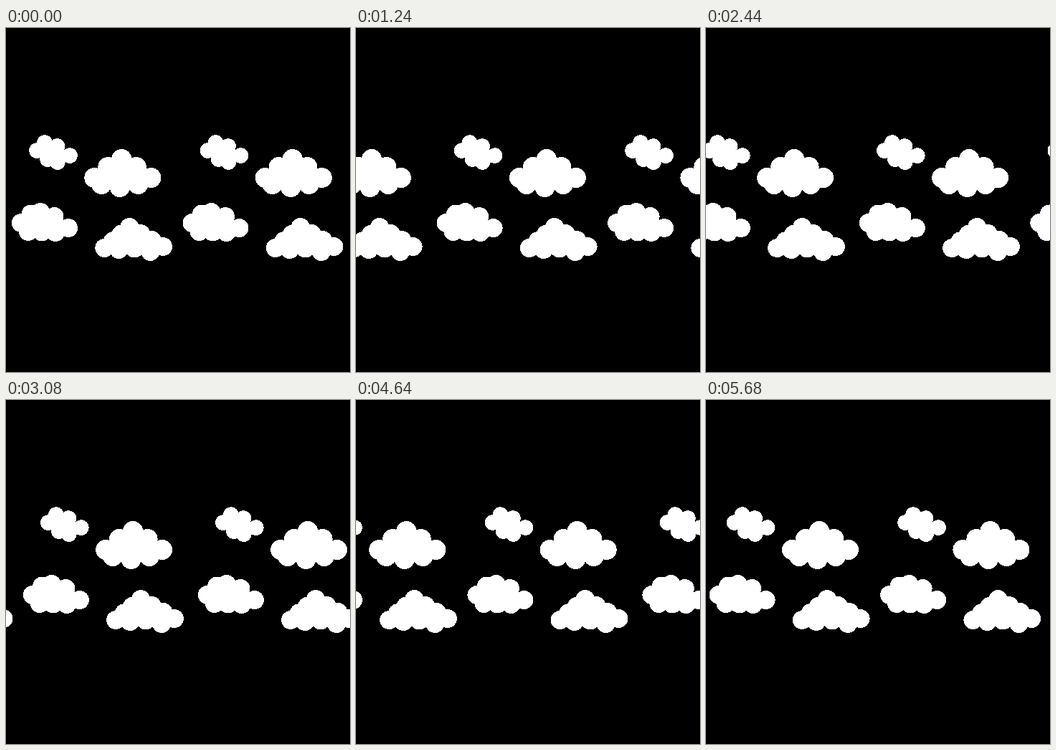
Write an HTML page with a canvas that moves like this. It is 480 by 480 pixels and loops after 5.72 s.

```html
<!DOCTYPE html>
<html lang="en">
<head>
<meta charset="utf-8">
<title>Drifting clouds</title>
<style>
  html, body { margin: 0; width: 100%; height: 100%; overflow: hidden; background: #000; }
  canvas { display: block; width: 100vmin; height: 100vmin; }
</style>
</head>
<body>
<canvas id="stage" width="480" height="480"></canvas>
<script>
const LOOP = 5720, STEP = 40;
const SPAN = 482.5, GAP = 238.5;
const TOP = 140, BAND = 200;

// Evenly spaced points from a to b, b left out; the row bows down by sag.
function row(a, b, steps, sag = 0) {
  return Array.from({ length: steps }, (_, i) => {
    const t = i / steps;
    return [
      a[0] + (b[0] - a[0]) * t,
      a[1] + (b[1] - a[1]) * t + sag * Math.sin(Math.PI * t)
    ];
  });
}

// A cloud is a ring of equal puffs: up to the peak, down again, back along the base.
function cloud({ r, left, peak, right, base, rise, fall, floor, arch = 0, sag = 0 }) {
  const [start, end] = base;
  const ring = [
    ...row(left, peak, rise, -arch),
    ...row(peak, right, fall, -arch),
    right,
    ...row(end, start, floor, sag),
    start
  ];
  const path = new Path2D();
  ring.forEach(([x, y]) => path.lineTo(x, y));
  path.closePath();
  for (const [x, y] of ring) {
    const puff = new Path2D();
    puff.arc(x, y, r, 0, Math.PI * 2);
    path.addPath(puff);
  }
  return path;
}

const clouds = [
  cloud({ r: 10.8, left: [43, 171], peak: [54, 160], right: [89, 178],
    base: [[58, 183], [72, 187]], rise: 1, fall: 2, floor: 1, arch: 4 }),
  cloud({ r: 14, left: [123.3, 209], peak: [161.3, 183], right: [202.3, 209],
    base: [[133.3, 218], [184.3, 218]], rise: 2, fall: 2, floor: 2, arch: 2, sag: 4 }),
  cloud({ r: 13, left: [21, 272], peak: [48, 257], right: [87, 279],
    base: [[31, 284], [69, 285]], rise: 2, fall: 2, floor: 2, arch: 5 }),
  cloud({ r: 13, left: [137.3, 307], peak: [172.3, 278], right: [219, 305],
    base: [[157.3, 309], [201.3, 312]], rise: 3, fall: 3, floor: 2, sag: -3 })
];

const ctx = document.getElementById('stage').getContext('2d', { willReadFrequently: true });

function drawGroup(x) {
  ctx.setTransform(1, 0, 0, 1, x, 0);
  clouds.forEach(c => ctx.fill(c));
  ctx.resetTransform();
}

// Crisp edges: every pixel is either black or white.
function harden() {
  const img = ctx.getImageData(0, TOP, 480, BAND);
  const d = img.data;
  for (let i = 0; i < d.length; i += 4) {
    d[i] = d[i + 1] = d[i + 2] = d[i] > 127 ? 255 : 0;
  }
  ctx.putImageData(img, 0, TOP);
}

function draw(ms) {
  const t = Math.floor((ms % LOOP) / STEP) * STEP;
  const shift = SPAN * t / LOOP;
  ctx.fillStyle = '#000';
  ctx.fillRect(0, 0, 480, 480);
  ctx.fillStyle = '#fff';
  for (const x of [shift, shift + GAP]) {
    drawGroup(x);
    drawGroup(x - SPAN);
  }
  harden();
}

const t0 = performance.now();
function tick() {
  draw(performance.now() - t0);
  requestAnimationFrame(tick);
}
tick();
</script>
</body>
</html>
```
